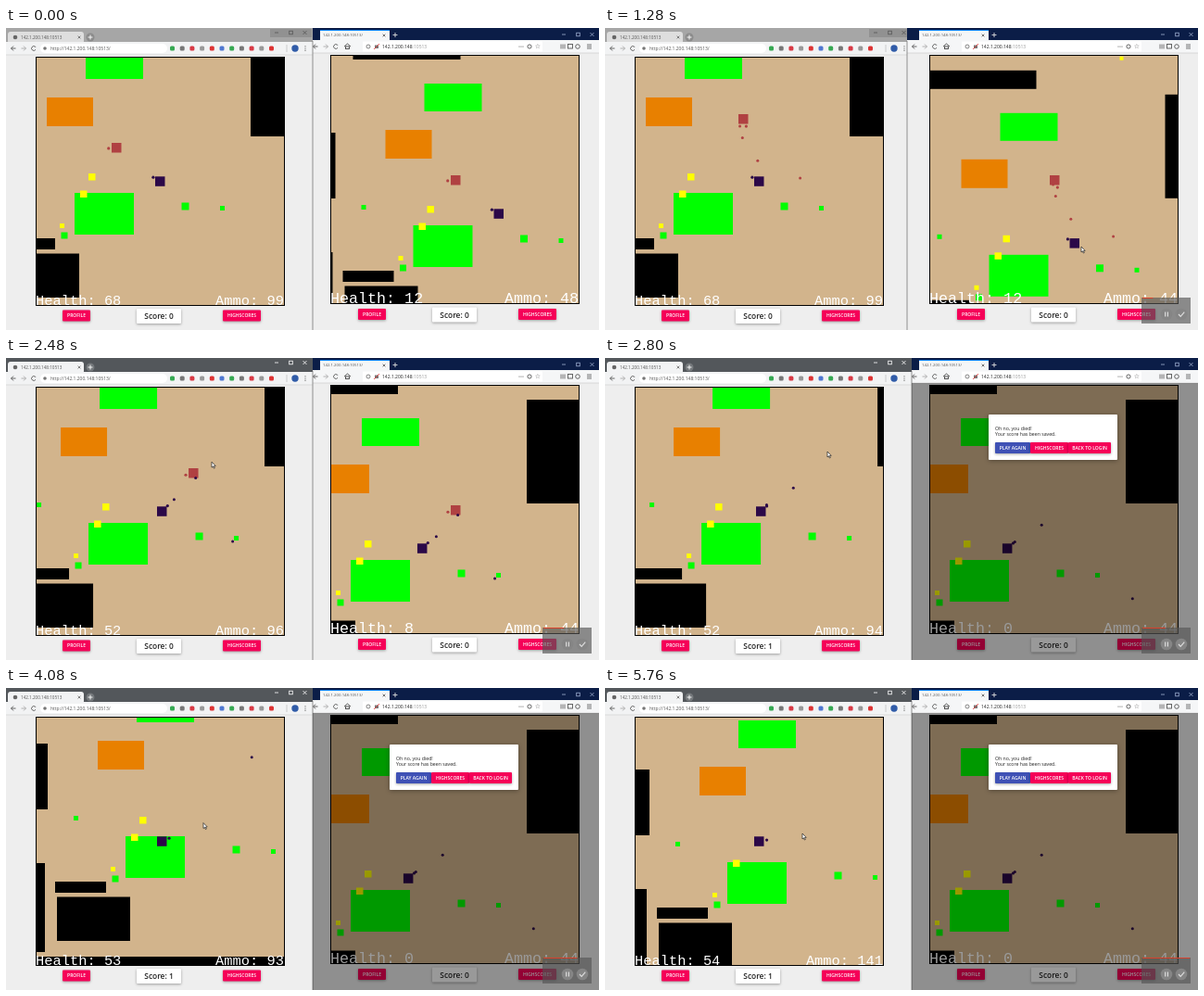
These frames come from a looping animation (640 by 326 pixels, 5840 ms). An HTML page with a canvas:

```html
<!DOCTYPE html>
<html lang="en">
<head>
<meta charset="utf-8">
<title>Two player arena</title>
<style>
html, body { margin: 0; width: 100%; height: 100%; overflow: hidden; background: #eee; }
canvas { display: block; width: 640px; height: 326px; }
</style>
</head>
<body>
<canvas id="stage" width="640" height="326"></canvas>
<script>
const ctx = document.getElementById('stage').getContext('2d');
const LOOP = 5840, STEP = 80, DEATH = 2720, FREEZE = 2800, PICKUP = 4720;
const TAN = '#d2b48c', GREEN = '#00ff00', YELLOW = '#ffff00', ORANGE = '#e88000';
const DARK = '#2b0848', RED = '#b04142', PINK = '#f50057';
const SANS = '"Open Sans", sans-serif', MONO = '"Liberation Mono", monospace';

const ramp = (t, from, to) => Math.min(1, Math.max(0, (t - from) / (to - from)));
const range = n => [...Array(n).keys()];

// Motion: each player walks straight while a key is held.
const camera = t => [
  55 * ramp(t, 2160, 3330) + 17 * ramp(t, 4080, 4940) - 14 * ramp(t, 4960, 5440),
  -18 * ramp(t, 3360, 3920) + 28 * ramp(t, 4080, 4720)
];
const rival = t => {
  const a = ramp(t, 0, 1280), b = ramp(t, 1280, 2000);
  return [114 + 30 * a + 38 * b, 124 - 31 * a + 26 * b];
};
const rivalCamera = t => {
  const a = ramp(t, 0, 1280), b = ramp(t, 1280, 2000);
  return [365.5 - 25 * a - 42.5 * b, 35 + 31.8 * a - 26.8 * b];
};
const pointer = t => {
  const out = ramp(t, 0, 1280), cross = ramp(t, 1440, 1840);
  const aim = ramp(t, 2080, 2640), rest = ramp(t, 2800, 4000), drift = ramp(t, 4000, 5760);
  return [
    440 + 74 * out - 337 * cross + 63 * aim - 27 * rest,
    168 + 68 * out - 96 * cross - 39 * aim + 44 * rest + 12 * drift
  ];
};

function ownAngle(t) {
  if (t < 1600) return 3.68;
  const [px, py] = pointer(t);
  const sweep = 0.88 - Math.max(0, t - 2000) * 0.01;
  return t < 2000 ? sweep : Math.max(sweep, Math.atan2(py - 165, px - 167));
}

function rivalAngle(t) {
  const [px, py] = pointer(t);
  return t < 1840 ? Math.atan2(py - 164, px - 485) : 2.9;
}

// Shots leave the shooter's centre and fly straight at a constant speed.
const rivalShots = range(4).map(i => {
  const start = 1280 - 960 * (1 - i / 4) ** 3;
  const [x, y] = rival(start);
  return { start, end: 1800, x: x + 5, y: y + 5, angle: 0.45 + 0.5 * i, speed: 0.09 };
});
const ownShots = range(6).map(i => {
  const start = i < 5 ? 2040 + 185 * i : 3300;
  const [dx, dy] = camera(start);
  const hit = i === 1 || i === 2;
  return { start, end: start + (hit ? 280 : 1000), x: 166 - dx, y: 165 - dy, angle: ownAngle(start), speed: 0.147 };
});
const fired = (list, t) => list.filter(s => t >= s.start).length;

function rect(color, x, y, w, h, r = 0) {
  ctx.fillStyle = color;
  if (!r) return ctx.fillRect(x, y, w, h);
  ctx.beginPath();
  ctx.roundRect(x, y, w, h, r);
  ctx.fill();
}

function dot(color, x, y, r = 1.5) {
  ctx.fillStyle = color;
  ctx.beginPath();
  ctx.arc(x, y, r, 0, 7);
  ctx.fill();
}

function line(color, width, ...p) {
  ctx.strokeStyle = color;
  ctx.lineWidth = width;
  ctx.beginPath();
  for (let i = 0; i < p.length; i += 2) ctx.lineTo(p[i], p[i + 1]);
  ctx.stroke();
}

function ring(color, x, y, r, from = 0, to = 7) {
  ctx.strokeStyle = color;
  ctx.lineWidth = 0.9;
  ctx.beginPath();
  ctx.arc(x, y, r, from, to);
  ctx.stroke();
}

function text(str, x, y, font, color, align = 'left') {
  ctx.font = font;
  ctx.fillStyle = color;
  ctx.textAlign = align;
  ctx.fillText(str, x, y);
}

function card(color, x, y, w, h, blur = 3) {
  ctx.save();
  ctx.shadowColor = 'rgba(0,0,0,0.35)';
  ctx.shadowBlur = blur;
  ctx.shadowOffsetY = 1;
  rect(color, x, y, w, h, 1);
  ctx.restore();
}

function button(label, x, y, w, color = PINK) {
  card(color, x, y, w, 12);
  text(label, x + w / 2, y + 7.9, `600 5px ${SANS}`, '#fff', 'center');
}

function cross(color, x, y, r) {
  line(color, 0.8, x - r, y - r, x + r, y + r);
  line(color, 0.8, x - r, y + r, x + r, y - r);
}

function plus(color, x, y) {
  line(color, 0.9, x - 2.5, y, x + 2.5, y);
  line(color, 0.9, x, y - 2.5, x, y + 2.5);
}

function windowKeys(color, x, y) {
  line(color, 0.8, x - 2, y, x + 2, y);
  ctx.strokeRect(x + 13.7, y - 1.8, 3.6, 3.6);
  cross(color, x + 30.5, y, 2);
}

function navIcons(x, y) {
  for (const [cx, dir, color] of [[x, -1, '#555'], [x + 11, 1, '#aaa']]) {
    line(color, 0.9, cx - 2.5, y, cx + 2.5, y);
    line(color, 0.9, cx, y - 2.5, cx + 2.5 * dir, y, cx, y + 2.5);
  }
  ring('#555', x + 22, y, 2.4, 0.6, 5.8);
}

function leftBrowser(t) {
  const active = t >= 1760;
  rect('#eeeeee', 0, 0, 331, 326);
  rect(active ? '#53575b' : '#a6a6a6', 0, 0, 331, 16);
  if (!active) rect('#919191', 285, 1, 45, 9);
  rect(active ? '#f2f3f4' : '#dedede', 2, 4, 82, 13, 3);
  dot('#666', 10, 10, 2.3);
  text('142.1.200.148:10513', 16, 12, `4.6px ${SANS}`, '#555');
  cross('#666', 79, 10, 1.4);
  dot(active ? '#74787b' : '#8c8c8c', 91, 10, 4.5);
  plus('#fff', 91, 10);
  windowKeys(active ? '#fff' : '#555', 292, 5);

  rect('#f2f3f4', 0, 15, 331, 14);
  navIcons(8, 22);
  rect('#fff', 37, 17, 137, 10, 5);
  dot('#777', 42, 22, 1.8);
  text('http://142.1.200.148:10513/', 48, 24, `5px ${SANS}`, '#555');
  const tints = ['#36a852', '#777', '#d83a45', '#999', '#d33', '#5078d0'];
  range(11).forEach(i => rect(tints[i % 6], 177 + i * 10.7, 19.5, 5, 5, 1.5));
  line('#bbb', 0.7, 303, 18, 303, 26);
  dot('#315ca8', 312, 22, 3.7);
  range(3).forEach(i => dot('#555', 323, 19.8 + 2.2 * i, 0.6));
  line('#d0d0d0', 0.7, 0, 29, 331, 29);
}

function rightBrowser(t) {
  const edge = t >= 80 && t < 1760 ? 326 : 331;
  rect('#eeeeee', edge, 0, 640 - edge, 326);
  rect('#0b1d47', edge, 0, 640 - edge, 14);
  rect('#f5f6f7', 339, 2, 75, 12);
  rect('#0a84ff', 339, 2, 75, 1);
  text('142.1.200.148:10513/', 342, 9.3, `4.3px ${SANS}`, '#555');
  cross('#555', 408, 8, 1.4);
  plus('#ddd', 420, 7.5);
  windowKeys('#9fb0d0', 602, 7);

  rect('#f5f6f7', edge, 13, 640 - edge, 14);
  navIcons(334, 20);
  line('#444', 0.9, 365, 20, 368.5, 17, 372, 20);
  ctx.strokeRect(366.5, 20, 4, 2.5);
  rect('#fff', 385, 14.5, 194, 11, 1);
  ring('#777', 391, 20, 2);
  rect('#777', 398, 18.5, 4, 3.5);
  line('#d33', 0.8, 397, 23, 403, 17);
  const font = `5px ${SANS}`, host = '142.1.200.148';
  text(host, 406, 22, font, '#222');
  text(':10513', 406 + ctx.measureText(host).width, 22, font, '#999');
  range(3).forEach(i => {
    dot('#555', 554 + 2 * i, 20, 0.6);
    line('#555', 0.8, 599 + 2 * i, 17.5, 599 + 2 * i, 22.5);
    line('#555', 0.8, 627, 18 + 2 * i, 632, 18 + 2 * i);
  });
  ring('#555', 565, 20, 2.1);
  text('☆', 574, 22.4, '7px "DejaVu Sans", sans-serif', '#555', 'center');
  ctx.strokeRect(606.5, 17.5, 5, 4.5);
  ring('#555', 617, 20, 2.3);
  line('#ccc', 0.7, edge, 27, 640, 27);
  line('#777', 0.8, edge, 14, edge, 326);
}

function scenery(dx, dy, showAmmo) {
  ctx.save();
  ctx.translate(dx, dy);
  rect(GREEN, 86, 25, 62, 30);
  rect(GREEN, 74, 178, 64, 45);
  rect(GREEN, -94, 175, 62, 48);
  rect(ORANGE, 44, 75, 50, 31);

  rect('#000', 264, 5, 80, 112);
  rect('#000', 9, -21, 116, 20);
  rect('#000', -2, 227, 55, 12);
  rect('#000', 0, 243.5, 79, 47.5);
  rect('#000', -38, 78, 28, 71);
  rect('#000', -29, 207, 16, 96);
  rect('#000', -80, 308, 480, 20);

  const pickup = (color, size, x, y) => rect(color, x, y, size, size);
  pickup(GREEN, 7, 59.5, 220.5);
  pickup(GREEN, 8, 189.5, 188.5);
  pickup(GREEN, 5, 231, 192);
  pickup(GREEN, 5, 18, 156);
  pickup(YELLOW, 7.5, 80, 175.5);
  pickup(YELLOW, 5, 58, 211);
  pickup(YELLOW, 4, 215, -36);
  if (showAmmo) pickup(YELLOW, 7.5, 89, 157);
  ctx.restore();
}

function shots(list, color, t, dx, dy) {
  for (const s of list) {
    if (t < s.start || t >= s.end) continue;
    const d = 7 + (t - s.start) * s.speed;
    dot(color, s.x + dx + d * Math.cos(s.angle), s.y + dy + d * Math.sin(s.angle));
  }
}

function fighter(color, x, y, angle) {
  rect(color, x, y, 10.5, 10.5);
  dot(color, x + 5.2 + 8.5 * Math.cos(angle), y + 5.2 + 8.5 * Math.sin(angle), 1.6);
}

function arena(x, y, size, health, ammo, draw) {
  ctx.save();
  ctx.beginPath();
  ctx.rect(x, y, 269, 269);
  ctx.clip();
  rect(TAN, x, y, 269, 269);
  draw();
  const font = `${size}px ${MONO}`;
  text('Health: ' + health, x, y + 267.5, font, '#fff');
  text('Ammo: ' + ammo, x + 268, y + 267.5, font, '#fff', 'right');
  ctx.restore();
  ctx.strokeStyle = '#000';
  ctx.lineWidth = 1;
  ctx.strokeRect(x + 0.5, y + 0.5, 268, 268);
}

function footer(x, y, score) {
  button('PROFILE', x, y, 30);
  button('HIGHSCORES', x + 173, y, 41);
  card('#fff', x + 80, y - 1.5, 48, 16);
  text('Score: ' + score, x + 104, y + 9.5, `600 8.4px ${SANS}`, '#222', 'center');
}

function dialog() {
  rect('rgba(0,0,0,0.4)', 331, 27, 309, 299);
  card('#fff', 414, 61, 139, 49, 5);
  text('Oh no, you died!', 421, 77.5, `5.2px ${SANS}`, '#222');
  text('Your score has been saved.', 421, 84, `5.2px ${SANS}`, '#222');
  button('PLAY AGAIN', 421, 91, 38, '#3f51b5');
  button('HIGHSCORES', 459, 91, 41);
  button('BACK TO LOGIN', 500, 91, 46);
}

function recorder(t) {
  rect('rgba(85,85,85,0.65)', 579, 291, 53, 28);
  rect('#d8402c', 580, 291, 52 * t / LOOP, 1);
  for (const x of [606, 622]) dot('#858585', x, 309, 6.3);
  for (const x of [604.7, 607.4]) line('#ddd', 1.2, x, 306.5, x, 311.5);
  line('#ddd', 1.2, 619, 309, 621.2, 311.3, 625.3, 306.7);
}

function arrow(x, y) {
  ctx.beginPath();
  for (const [a, b] of [[0, 0], [0, 6], [1.4, 4.8], [2.4, 7], [3.3, 6.6], [2.4, 4.5], [4.2, 4.4]]) {
    ctx.lineTo(x + a, y + b);
  }
  ctx.closePath();
  ctx.fillStyle = '#fff';
  ctx.fill();
  ctx.strokeStyle = '#222';
  ctx.lineWidth = 0.7;
  ctx.stroke();
}

function leftGame(t) {
  const [dx, dy] = camera(t), [rx, ry] = rival(t);
  const lag = camera(t + STEP)[0] > dx + 0.5 ? 2 : 0;
  const health = 68 - 8 * Math.floor(2 * ramp(t, 1280, 1840)) + Math.floor(2 * ramp(t, 2400, 4700));
  const ammo = t < PICKUP ? 99 - fired(ownShots, t) : 141;
  leftBrowser(t);
  arena(32, 31, 15.4, health, ammo, () => {
    scenery(dx, dy, t < PICKUP);
    if (t < DEATH) fighter(RED, rx + dx, ry + dy, rivalAngle(t));
    fighter(DARK, 161 + lag, 160.3, ownAngle(t));
    shots(rivalShots, RED, t, dx, dy);
    shots(ownShots, DARK, t, dx, dy);
  });
  footer(61, 304.5, t < DEATH ? 0 : 1);
}

function rightGame(now) {
  const t = Math.min(now, FREEZE);
  const [dx, dy] = rivalCamera(t), [rx, ry] = rival(t), [ox, oy] = camera(t);
  const health = 12 - 4 * Math.floor(3 * ramp(t, 2240, DEATH));
  rightBrowser(t);
  arena(350, 29, 16.7, health, 48 - fired(rivalShots, t), () => {
    scenery(dx, dy, true);
    if (t < DEATH) fighter(RED, 480, 159, rivalAngle(t));
    fighter(DARK, 161 - ox + dx, 160.3 - oy + dy, ownAngle(t));
    shots(rivalShots, RED, t, 482 - rx, 156 - ry);
    shots(ownShots, DARK, t, dx, dy);
  });
  footer(380, 303, 0);
  if (t >= DEATH) dialog();
}

function render(t) {
  leftGame(t);
  rightGame(t);
  if (t >= 400) recorder(t);
  if (t >= 160) arrow(...pointer(t));
}

const start = performance.now();
function tick() {
  const t = (performance.now() - start) % LOOP;
  render(Math.floor(t / STEP) * STEP);
  requestAnimationFrame(tick);
}
tick();
</script>
</body>
</html>
```
